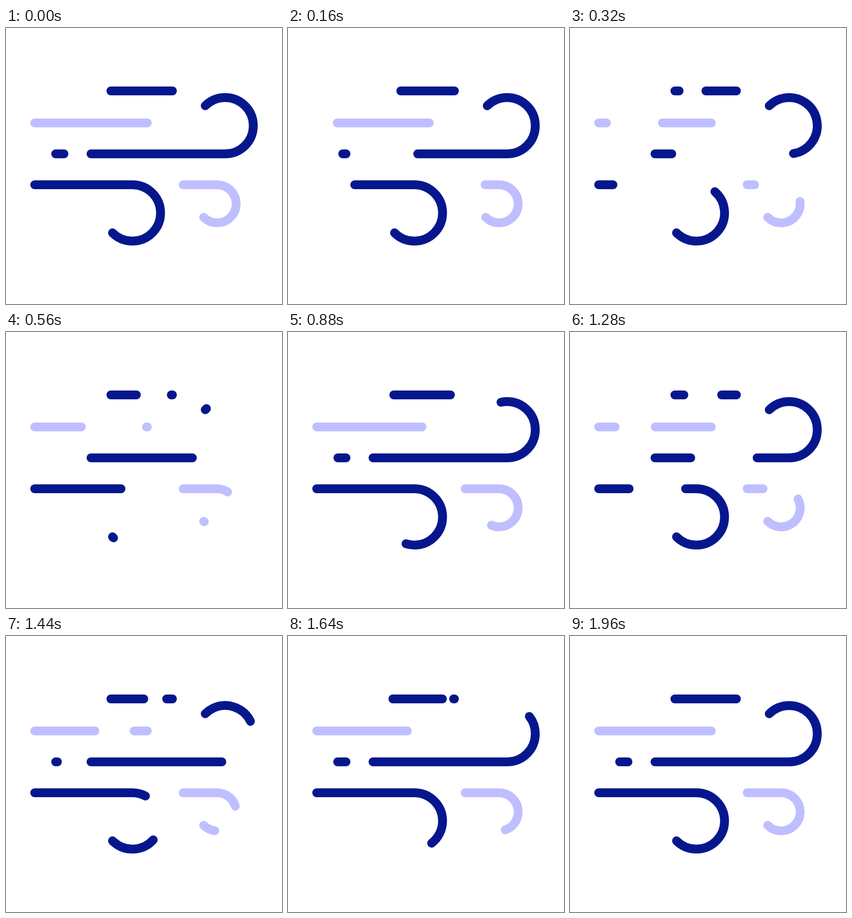
An HTML page with a canvas for the animation above (2 s loop, 500 by 500 pixels).

```html
<!DOCTYPE html>
<html lang="en">
<head>
<meta charset="utf-8">
<title>Wind</title>
<style>
  html, body { margin: 0; width: 100%; height: 100%; overflow: hidden; background: #fff; }
  canvas { display: block; }
</style>
</head>
<body>
<canvas id="stage" width="500" height="500"></canvas>
<script>
const ctx = document.getElementById("stage").getContext("2d");
const LOOP = 2000;
const DARK = "#06178e";
const LIGHT = "#bfbfff";
const SWEEP = Math.PI * 1.25;

// Cubic bezier easing, solved by bisection
function bezier(x1, y1, x2, y2) {
  const at = (a, b, s) => 3 * a * s * (1 - s) ** 2 + 3 * b * s * s * (1 - s) + s ** 3;
  return x => {
    if (x <= 0) return 0;
    if (x >= 1) return 1;
    let lo = 0, hi = 1;
    for (let i = 0; i < 30; i++) {
      const mid = (lo + hi) / 2;
      if (at(x1, x2, mid) < x) lo = mid; else hi = mid;
    }
    return at(y1, y2, lo);
  };
}

const clamp = x => Math.min(1, Math.max(0, x));
const smooth = x => {
  const k = clamp(x);
  return k * k * (3 - 2 * k);
};
const ramp = (from, to, ease = smooth) => t => ease((t - from) / (to - from));

const gust = ramp(172, 1008, bezier(0.388, 0, 0.667, 1));
const surge = ramp(1108, 1600, bezier(0.48, 0, 0.6, 0.85));
const drift = ramp(1600, 1960, clamp);
const breeze = t => 0.78 * surge(t) + 0.22 * drift(t);
const fade = ramp(0, 590);

// Each stroke is a straight run with an optional curl:
// turn 1 curls downwards, -1 curls upwards
const strokes = [
  { x: 190, y: 114, run: 111.5, color: DARK,
    tails: [ramp(32, 607), ramp(856, 1780, bezier(0.25, 0.1, 0.25, 1))] },
  { x: 52, y: 172, run: 204, color: LIGHT, tails: [fade, ramp(1000, 1560)] },
  { x: 90, y: 228, run: 15, color: DARK,
    tails: [ramp(0, 280), ramp(850, 1180)],
    heads: [ramp(600, 850), ramp(1370, 1610)] },
  { x: 154, y: 228, run: 243, r: 51, turn: -1, color: DARK, tails: [fade, ramp(1000, 1632)] },
  { x: 52, y: 284, run: 177, r: 51, turn: 1, color: DARK, tails: [fade, ramp(1000, 1632)] },
  { x: 321, y: 284, run: 61.5, r: 34.5, turn: 1, color: LIGHT, tails: [fade, ramp(1000, 1560)] }
];

function trim(s, from, to) {
  if (to <= from) return;
  const curl = (s.r || 0) * SWEEP;
  const a = from * (s.run + curl);
  const b = to * (s.run + curl);
  ctx.beginPath();
  if (a < s.run) {
    ctx.moveTo(s.x + a, s.y);
    ctx.lineTo(s.x + Math.min(b, s.run), s.y);
  }
  if (s.r && b > s.run) {
    const angle = d => s.turn * (Math.max(0, d - s.run) / s.r - Math.PI / 2);
    ctx.arc(s.x + s.run, s.y + s.turn * s.r, s.r, angle(a), angle(b), s.turn < 0);
  }
  ctx.strokeStyle = s.color;
  ctx.stroke();
}

function draw(t) {
  ctx.fillStyle = "#fff";
  ctx.fillRect(0, 0, 500, 500);
  ctx.lineWidth = 16;
  ctx.lineCap = "round";
  ctx.lineJoin = "round";
  for (const s of strokes) {
    const [tail1, tail2] = s.tails.map(f => f(t));
    const [head1, head2] = (s.heads || [gust, breeze]).map(f => f(t));
    trim(s, tail1, 1);
    trim(s, tail2, head1);
    trim(s, 0, head2);
  }
}

const start = performance.now();
function tick() {
  draw((performance.now() - start) % LOOP);
  requestAnimationFrame(tick);
}
tick();
</script>
</body>
</html>
```
